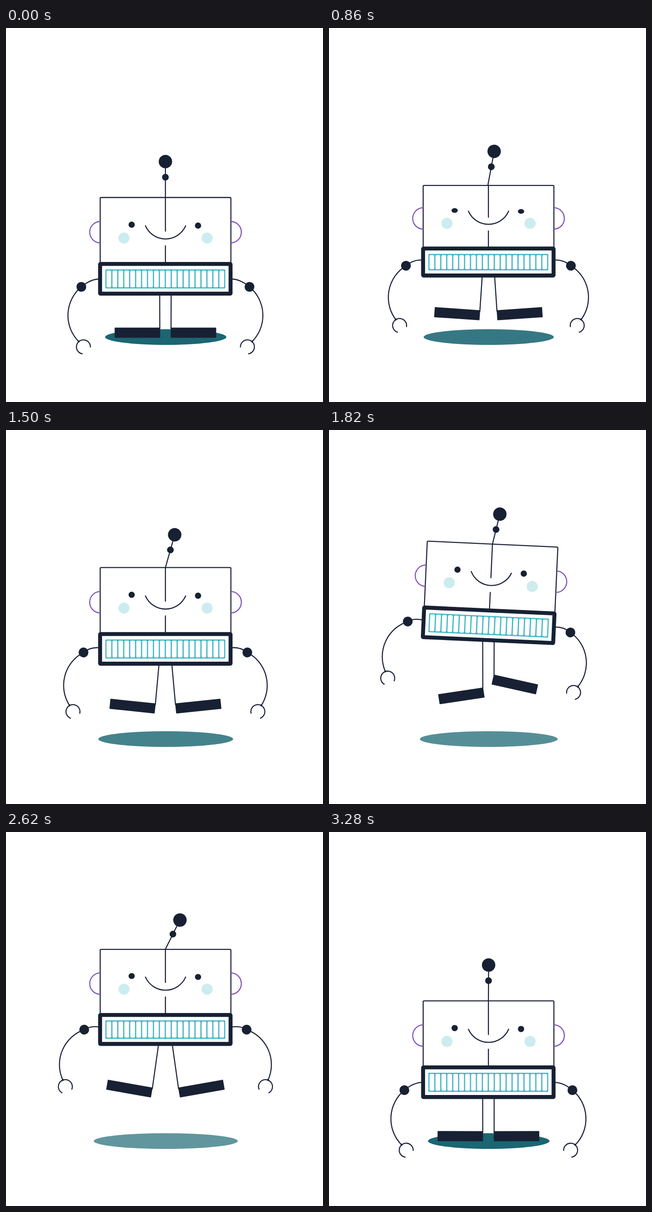
Animation, 690 px wide and 812 px high, one loop 3300 ms. Source, as an HTML page:

```html
<!DOCTYPE html>
<html lang="en">
<head>
<meta charset="utf-8">
<title>Jumping robot</title>
<style>
html, body { margin: 0; width: 100%; height: 100%; overflow: hidden; background: #fff; }
svg { display: block; width: 100%; height: 100%; }
.ink { fill: #172133; }
.line { fill: none; stroke: #1b2138; stroke-width: 2.3; stroke-linecap: round; stroke-linejoin: round; }
.ear { fill: none; stroke: #7e52bd; stroke-width: 2.3; stroke-linecap: round; }
.cheek { fill: #cdecef; }
</style>
</head>
<body>
<svg id="stage" viewBox="0 0 690 812"></svg>
<script>
const PERIOD = 1650, MID = 347, FLOOR = 651, REST = 581;
const stage = document.getElementById('stage');

function add(parent, tag, attrs) {
  const el = document.createElementNS('http://www.w3.org/2000/svg', tag);
  set(el, attrs || {});
  parent.appendChild(el);
  return el;
}
function set(el, attrs) {
  for (const k in attrs) el.setAttribute(k, attrs[k]);
}

// Smooth monotone curve through [time, value] points, at rest at both ends.
function track(...points) {
  const p = [[0, 0], ...points, [PERIOD, 0]];
  const slope = i => (p[i + 1][1] - p[i][1]) / (p[i + 1][0] - p[i][0]);
  const m = p.map((_, i) => {
    if (i === 0 || i === p.length - 1) return 0;
    const a = slope(i - 1), b = slope(i);
    return a * b > 0 ? 2 * a * b / (a + b) : 0;
  });
  return t => {
    let i = 0;
    while (i < p.length - 2 && t >= p[i + 1][0]) i++;
    const w = p[i + 1][0] - p[i][0], u = (t - p[i][0]) / w, v = 1 - u;
    return v * v * (1 + 2 * u) * p[i][1] + u * u * (3 - 2 * u) * p[i + 1][1]
      + u * v * w * (v * m[i] - u * m[i + 1]);
  };
}
// The small tilted hop; everything returns to zero in the crouch.
const hop = (a, b, c, d) => track([170, a], [320, b], [480, c], [610, d], [740, 0]);
// Squeezing on the way down, released during the leap.
const squeeze = early => track([320, 0], [480, early], [610, 1], [740, 1.1], [900, .4], [1050, 0]);

// The big straight leap, 0 to 1.
const leap = track([740, 0], [900, .3], [1050, .79], [1080, .9], [1200, 1],
  [1330, .948], [1590, .03], [1630, .0062]);
const lift = track([170, 120], [320, 185], [480, 137], [610, 20.8], [740, -45], [900, 0]);
const squash = squeeze(.28), nod = squeeze(.65);
const lean = hop(2.6, 3.6, 3, 1.1);
const whip = hop(13.8, 20, 19.5, 8.9);
const shrink = hop(-11, -13, -12, 0);
const shade = hop(18, 25, 22.5, 8.5);
const moves = [
  { k: 1, swing: hop(-21.4, -33.8, -24, -2.7), elbow: hop(-17.6, -25, -21, -8.5),
    foot: hop(91, 150, 111, 39), tilt: hop(-8.5, -10.5, -10.4, -3.8) },
  { k: -1, swing: hop(-5, -6.8, -4, 4.6), elbow: hop(-10, -13, -11, -3),
    foot: hop(119, 187, 146, 53), tilt: hop(-12.5, -16, -15.5, -5.6) }
];

const shadow = add(stage, 'ellipse', { cx: MID + .7, cy: 671, ry: 17, fill: '#1a6672' });

for (const s of moves) {
  const g = add(stage, 'g', { transform: `translate(${MID}) scale(${s.k},1)` });
  s.leg = add(g, 'path', { class: 'line' });
  s.shoe = add(g, 'rect', { class: 'ink', x: -99, y: -.5, width: 99, height: 22, rx: 1.2 });
}

const body = add(stage, 'g');
for (const s of moves) {
  s.upper = add(body, 'path', { class: 'line' });
  s.arm = add(body, 'g');
  add(s.arm, 'path', { class: 'line', d: 'M0 0A80.5 80.5 0 0 0 -80.4 88' });
  add(s.arm, 'path', { class: 'line', d: 'M-91.5 113A15.2 15.2 0 1 1 -68.5 113' });
  add(s.arm, 'circle', { class: 'ink', cx: -80.3, cy: 87.5, r: 2.2 });
  add(s.arm, 'circle', { class: 'ink', r: 10.6 });
}

const antenna = add(body, 'g');
const rod = add(antenna, 'path', { class: 'line' });
const bead = add(antenna, 'circle', { class: 'ink', r: 7.3 });
const bulb = add(antenna, 'circle', { class: 'ink', r: 14.6 });

const head = add(body, 'rect', { class: 'line', x: -142, width: 284.5, rx: 2, style: 'fill:#fff' });
const seam = add(body, 'path', { class: 'line' });

// Face parts sit relative to the top of the head.
const face = add(body, 'g');
const ears = add(body, 'g');
add(ears, 'path', { class: 'ear', d: 'M-143 52A23.3 23.3 0 0 0 -143 98.5' });
add(ears, 'path', { class: 'ear', d: 'M143.5 52A23.3 23.3 0 0 1 143.5 98.5' });
add(face, 'circle', { class: 'cheek', cx: -90.3, cy: 88, r: 12.1 });
add(face, 'circle', { class: 'cheek', cx: 90.7, cy: 88, r: 12.1 });
add(face, 'path', { class: 'line', d: 'M-43.5 61.5A47.8 47.8 0 0 0 44 61.5' });
const eyes = [[-73.5, 59], [71, 61]].map(([cx, y]) =>
  ({ y, el: add(face, 'ellipse', { class: 'ink', cx, rx: 6.8 }) }));

const frame = add(body, 'rect', { x: -142.2, width: 284, rx: 1,
  fill: '#fff', stroke: '#172133', 'stroke-width': 8.6, 'stroke-linejoin': 'round' });
const grille = add(body, 'rect', { x: -130.7, width: 261, rx: 1.5, fill: '#42b7c5' });
const cells = Array.from({ length: 20 }, (_, i) =>
  add(body, 'rect', { x: -128.2 + i * 12.93, width: 10.3, rx: 2.6, fill: '#fff' }));

function draw(t) {
  const s = leap(t), q = squash(t), n = nod(t), r = lean(t);
  const h = (q + n) / 2;
  const up = lift(t) + 228 * s;
  const box = 73 - 10 * q, top = -(213 - 10 * q - 13 * h);

  const wide = shade(t);
  set(shadow, { rx: 132 + wide + 48.5 * s, opacity: 1 - .0145 * wide - .61 * s });
  set(body, { transform: `translate(${MID - .35 * r} ${REST - up}) rotate(${r})` });

  for (const m of moves) {
    const x = -11.5 - 32 * s, y = FLOOR - m.foot(t) - 187 * s;
    set(m.leg, { d: `M${-12.5 - 4.5 * s} ${REST - up - 4}L${x - .7} ${y + 2}` });
    set(m.shoe, { transform: `translate(${x} ${y}) rotate(${m.tilt(t) + 19.6 * s})` });

    const ey = -19 + m.elbow(t) - 32 * s;
    const ex = -m.k * (175.9 + 7.1 * ((ey + 51) / 32) ** 3);
    const ay = -36 + .3 * (ey + 19), cy = ay + .22 * (ey + 19);
    set(m.upper, { d: `M${-m.k * 143} ${ay}Q${-m.k * 163} ${cy} ${ex} ${ey}` });
    const swing = 39.8 * (1 - s) + m.swing(t);
    set(m.arm, { transform: `translate(${ex} ${ey}) rotate(${-r}) scale(${m.k},1) rotate(${-swing})` });
  }

  const len = 78 + shrink(t) - 13 * s;
  set(antenna, { transform: `translate(${-2.2 * q} ${top}) rotate(${whip(t) + 52 * s - r})` });
  set(rod, { d: `M0 0V${-len}` });
  set(bead, { cy: -44 + (78 - len) * 1.03 });
  set(bulb, { cy: -len });

  set(head, { y: top, height: -top - box + 4 });
  set(seam, { d: `M0 ${top}v${73 - 7 * h}M0 ${top + 105 - 11 * h}V${-box}` });
  set(face, { transform: `translate(0 ${top - 10 * n})` });
  set(ears, { transform: `translate(0 ${top - 6.5 * q})` });
  for (const e of eyes) set(e.el, { cy: e.y + 1.7 * q, ry: 6.8 * (1 - .42 * q) });

  set(frame, { y: -box + 4.3, height: box - 8.6 });
  set(grille, { y: -box + 16, height: box - 31.5 });
  for (const c of cells) set(c, { y: -box + 18.5, height: box - 36.5 });
}

const start = performance.now();
function tick(now) {
  draw(Math.max(0, now - start) % PERIOD);
  requestAnimationFrame(tick);
}
draw(0);
requestAnimationFrame(tick);
</script>
</body>
</html>
```
